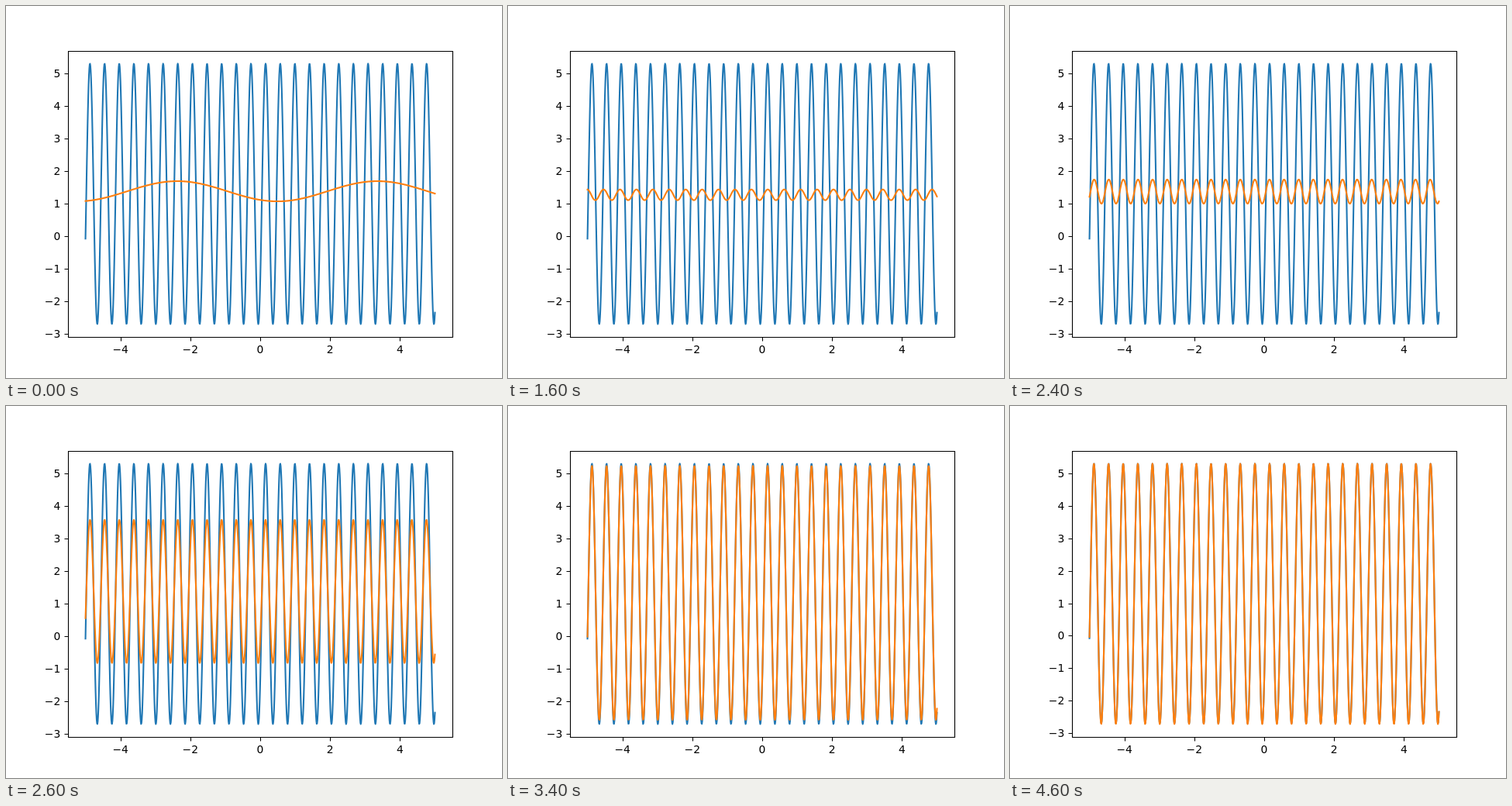
Animation, 640 px wide and 480 px high, one loop 4.8 s. Source, as an HTML page with a canvas:

```html
<!DOCTYPE html>
<html lang="en">
<head>
<meta charset="utf-8">
<title>Sine fit</title>
<style>
  html, body { margin: 0; width: 100%; height: 100%; overflow: hidden; background: #fff; }
  canvas { display: block; }
</style>
</head>
<body>
<canvas id="plot" width="640" height="480"></canvas>
<script>
const ctx = document.getElementById('plot').getContext('2d');
const LOOP = 4800, STEP = 200, POINTS = 1000;
const box = { left: 80.5, right: 576.5, top: 58.5, bottom: 427.5 };
const data = { left: 102.545, width: 450.91, top: 74.4, bottom: 410.4 };
const target = { amp: 4, freq: 15, phase: -0.75, mid: 1.3 };

// time, amplitude, frequency, phase, offset
const keys = [
  [0, -0.31, 1.097, 1.03, 1.38],
  [800, -0.01, 2.83, -0.95, 1.33],
  [1000, 0.12, 5.5, -0.85, 1.32],
  [1600, 0.165, 13.37, -0.57, 1.27],
  [2400, 0.37, 15.03, -0.7, 1.37],
  [2600, 2.2, 15.01, -0.73, 1.375],
  [2800, 3.2, 15, -0.75, 1.375],
  [3000, 3.655, 15, -0.75, 1.375],
  [3200, 3.82, 15, -0.75, 1.35],
  [3400, 3.9, 15, -0.75, 1.33],
  [3800, 3.955, 15, -0.75, 1.3],
  [4200, 4.01, 15, -0.735, 1.29],
  [4800, 4.01, 15, -0.735, 1.29]
];

function fitAt(time) {
  const i = keys.findIndex(k => k[0] > time);
  const a = keys[i - 1], b = keys[i];
  const u = (time - a[0]) / (b[0] - a[0]);
  const [, amp, freq, phase, mid] = a.map((v, j) => v + (b[j] - v) * u);
  return { amp, freq, phase, mid };
}

const toX = x => data.left + (x + 5) / 10 * data.width;

function drawWave(wave, toY, color) {
  ctx.beginPath();
  for (let i = 0; i < POINTS; i++) {
    const x = -5 + 10 * i / (POINTS - 1);
    ctx.lineTo(toX(x), toY(wave.mid + wave.amp * Math.sin(wave.freq * x + wave.phase)));
  }
  ctx.strokeStyle = color;
  ctx.lineWidth = 2.083;
  ctx.lineCap = 'square';
  ctx.lineJoin = 'round';
  ctx.stroke();
}

function drawAxes(toY) {
  const label = n => String(n).replace('-', '\u2212');
  ctx.strokeStyle = ctx.fillStyle = '#000';
  ctx.lineWidth = 1.11;
  ctx.lineCap = 'butt';
  ctx.lineJoin = 'miter';
  ctx.font = '13.889px "DejaVu Sans", sans-serif';
  ctx.beginPath();
  ctx.textAlign = 'center';
  for (let n = -4; n <= 4; n += 2) {
    const x = Math.round(toX(n)) + 0.5;
    ctx.moveTo(x, box.bottom);
    ctx.lineTo(x, box.bottom + 5);
    ctx.fillText(label(n), toX(n), 448);
  }
  ctx.textAlign = 'right';
  for (let n = -3; n <= 5; n++) {
    const y = Math.round(toY(n));
    ctx.moveTo(box.left, y + 0.5);
    ctx.lineTo(box.left - 5, y + 0.5);
    ctx.fillText(label(n), 70.28, y + 5);
  }
  ctx.rect(box.left, box.top, box.right - box.left, box.bottom - box.top);
  ctx.stroke();
}

function draw(time) {
  const fit = fitAt(time);
  // The vertical range grows with whichever curve reaches further
  const low = Math.min(...[target, fit].map(w => w.mid - Math.abs(w.amp)));
  const high = Math.max(...[target, fit].map(w => w.mid + Math.abs(w.amp)));
  const toY = y => data.bottom - (y - low) / (high - low) * (data.bottom - data.top);
  ctx.fillStyle = '#fff';
  ctx.fillRect(0, 0, 640, 480);
  drawWave(target, toY, '#1f77b4');
  drawWave(fit, toY, '#ff7f0e');
  drawAxes(toY);
}

const start = performance.now();
function tick() {
  const time = (performance.now() - start) % LOOP;
  draw(Math.floor(time / STEP) * STEP);
  requestAnimationFrame(tick);
}
tick();
</script>
</body>
</html>
```
